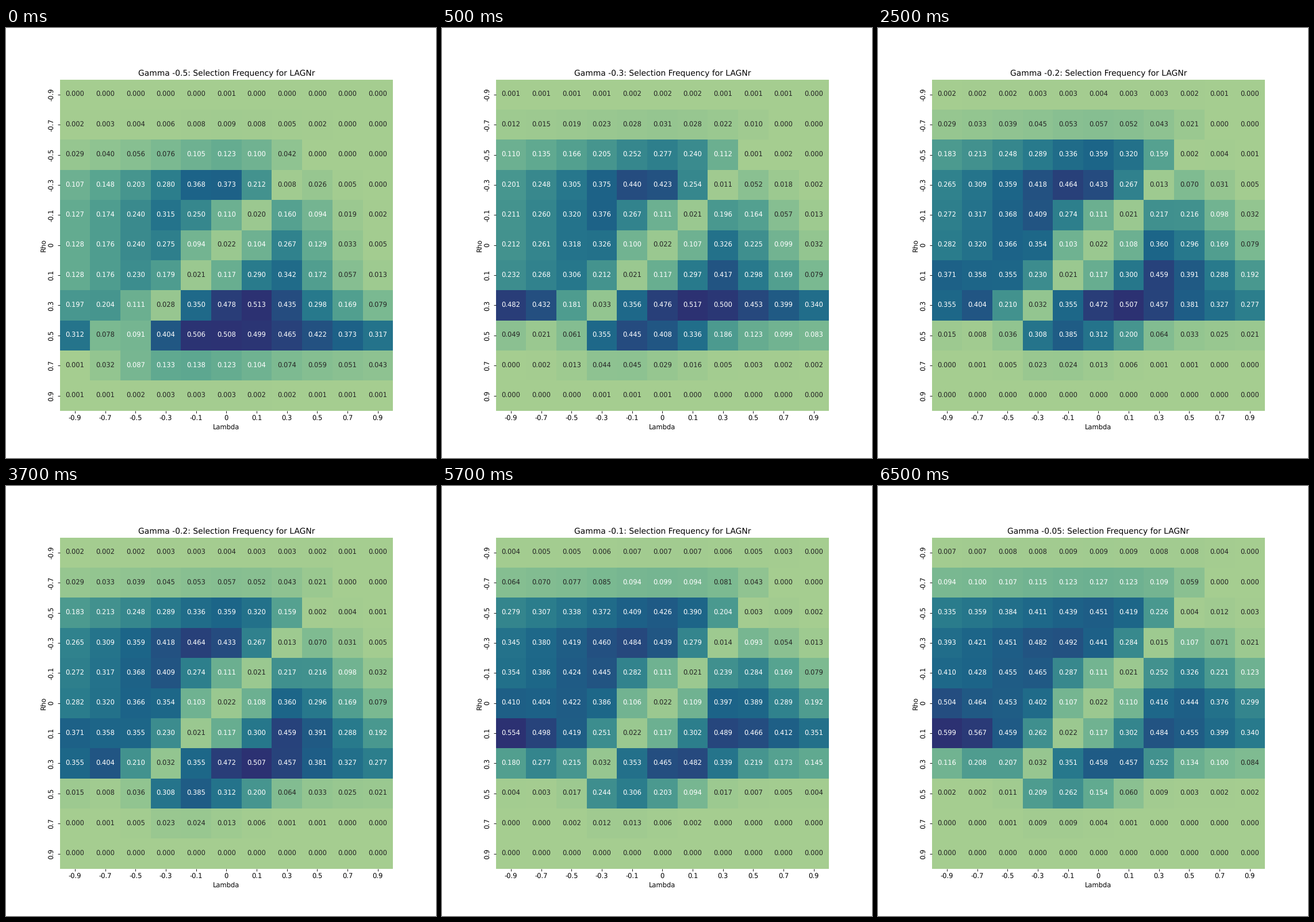
A matplotlib script that plays this animation: 748 px wide and 748 px high, repeating every 8000 ms.

```python
import numpy as np
import matplotlib.pyplot as plt
from matplotlib.animation import FuncAnimation
from matplotlib.colors import LinearSegmentedColormap

SCALE = 11 / 9  # keeps 9-inch proportions on an 11-inch figure
LEVELS = [-0.9, -0.7, -0.5, -0.3, -0.1, 0, 0.1, 0.3, 0.5, 0.7, 0.9]
GAMMAS = [-0.5, -0.3, -0.2, -0.1, -0.05]
N = len(LEVELS)
WHITE_TEXT_FROM = 0.156  # share of the maximum

lam, rho = np.meshgrid(LEVELS, LEVELS)


def step(x, width):
    return 1 / (1 + np.exp(-x / width))


def bell(x, width):
    return np.exp(-(x / width) ** 2)


def frequencies(gamma):
    g = abs(gamma)
    # Diagonal valley where the two effects cancel out.
    offset = lam + rho + 0.4 * np.maximum(rho, 0) ** 2
    valley = 1 - 0.96 * bell(offset, 0.23)
    # Band of rho values in which the model is selected at all.
    low = 0.45 * g - 0.64
    high = 0.2 + 0.8 * g + (0.3 - 0.5 * g) * bell(lam + 0.2, 0.4)
    band = step(rho - low, 0.07) * step(high - rho, 0.05)
    # Decay away from lambda = 0, with a ridge along the upper edge on the left.
    ridge = (0.24 + 0.3 * g) * np.abs(lam) * bell(rho - high + 0.15, 0.12)
    left = 0.54 * np.exp(-(0.2 + 2.8 * g) * np.abs(lam)) + ridge
    gap = np.maximum(g - rho - 0.03, 0)
    right = 0.54 * np.exp(-(0.5 + 11 * gap) * lam ** 2)
    return valley * band * np.where(offset < 0, left, right)


ramp = LinearSegmentedColormap.from_list("ramp", [
    "#a5cd90", "#7dba91", "#59a590", "#40908e",
    "#287a8c", "#1c6488", "#254b7f", "#2c3172"])

plt.rcParams.update({
    "font.family": "DejaVu Sans",
    "font.size": 10 * SCALE,
    "text.hinting": "no_hinting",
    "axes.titlepad": 6 * SCALE,
    "axes.labelpad": 2.5 * SCALE,
})
for axis in ("xtick", "ytick"):
    plt.rcParams.update({
        f"{axis}.major.size": 3.5 * SCALE,
        f"{axis}.major.width": 0.8 * SCALE,
        f"{axis}.major.pad": 3.5 * SCALE,
    })

fig = plt.figure(figsize=(11, 11), dpi=68, facecolor="white")
ax = fig.add_axes([0.125, 0.11, 0.775, 0.77])
mesh = ax.pcolormesh(np.zeros((N, N)), cmap=ramp, vmin=0, vmax=1)
ax.set(xlim=(0, N), ylim=(N, 0), xlabel="Lambda", ylabel="Rho")
ax.spines[:].set_visible(False)
centers = np.arange(N) + 0.5
ax.set_xticks(centers, LEVELS)
ax.set_yticks(centers, LEVELS, rotation=90, va="center")
title = ax.set_title("")
labels = [ax.text(x, y, "", ha="center", va="center")
          for y in centers for x in centers]


def update(frame):
    gamma = GAMMAS[(frame + 3) // 4]
    values = frequencies(gamma)
    shade = values / values.max()
    mesh.set_array(shade)
    title.set_text(f"Gamma {gamma}: Selection Frequency for LAGNr")
    for label, value, tone in zip(labels, values.flat, shade.flat):
        label.set_text(f"{value:.3f}")
        label.set_color("white" if tone >= WHITE_TEXT_FROM else "0.15")
    return [mesh, title, *labels]


anim = FuncAnimation(fig, update, frames=16, interval=500, repeat=True)
plt.show()
```
